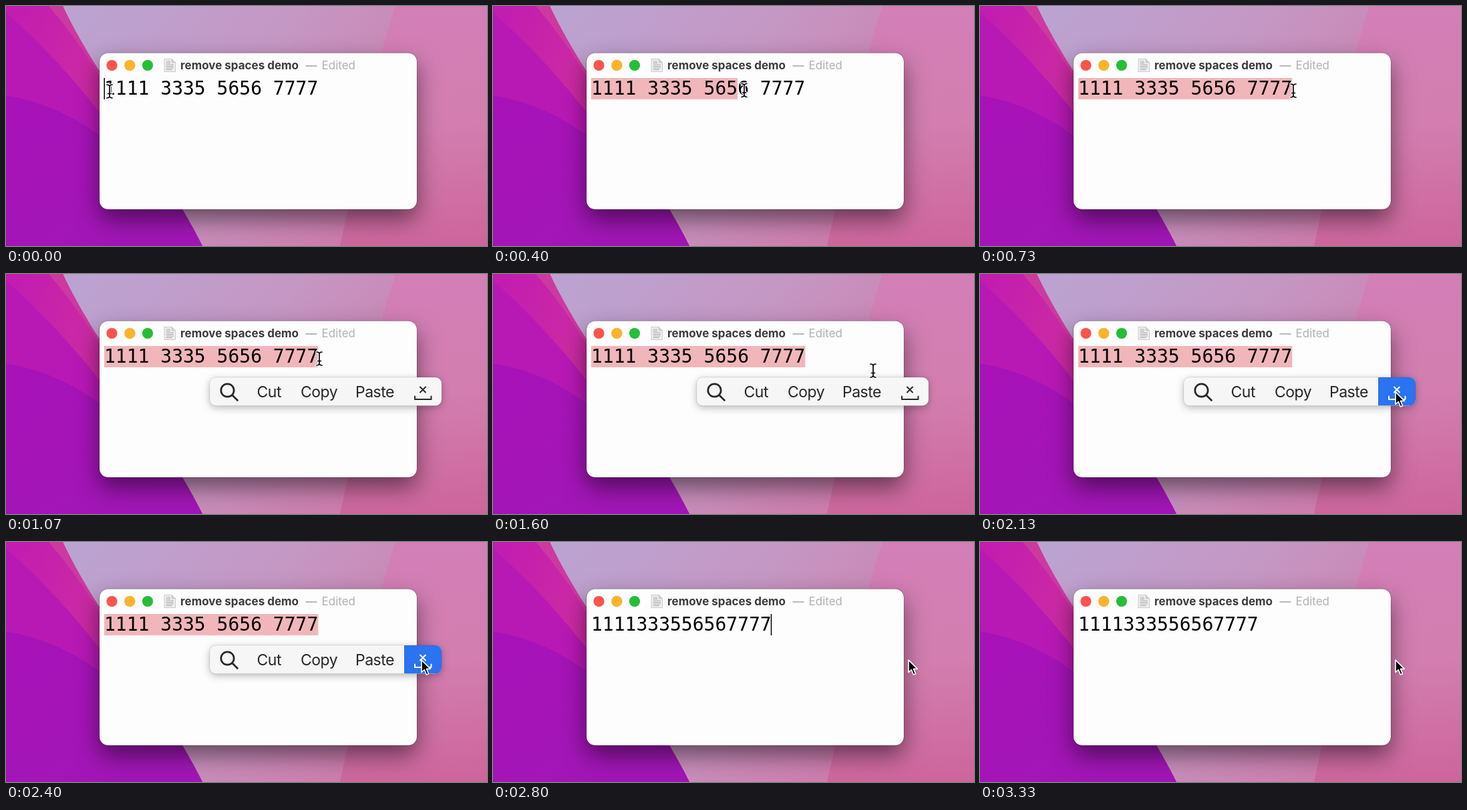
These frames come from a looping animation (720x360 px, 3.39 s). An HTML page:

```html
<!DOCTYPE html>
<html lang="en">
<head>
<meta charset="utf-8">
<title>Remove spaces</title>
<style>
  html, body { margin: 0; width: 100%; height: 100%; overflow: hidden; }
  svg { display: block; width: 720px; height: 360px; }
  text { white-space: pre; }
  .ui { font-family: Inter, sans-serif; font-size: 17px; }
  .mono { font-family: "DejaVu Sans Mono", monospace; font-size: 28px; }
  .menu { font-family: Inter, sans-serif; font-size: 23px; letter-spacing: -.5px; fill: #262626; }
  .line { fill: none; stroke-linecap: round; stroke-linejoin: round; }
  #window { filter: drop-shadow(0 15px 17px rgba(0, 0, 0, .5)); }
  #panel { filter: drop-shadow(0 3px 6px rgba(0, 0, 0, .28)); }
</style>
</head>
<body>
<svg viewBox="0 0 720 360">
  <defs>
    <linearGradient id="sky" gradientUnits="userSpaceOnUse" x1="120" y1="0" x2="560" y2="360">
      <stop offset="0" stop-color="#bba3d1"/>
      <stop offset=".45" stop-color="#c597c3"/>
      <stop offset="1" stop-color="#cf78a8"/>
    </linearGradient>
    <linearGradient id="rose" gradientUnits="userSpaceOnUse" x1="640" y1="0" x2="670" y2="360">
      <stop offset="0" stop-color="#d37fb8"/>
      <stop offset=".5" stop-color="#d27eaf"/>
      <stop offset="1" stop-color="#cd659b"/>
    </linearGradient>
    <linearGradient id="magenta" gradientUnits="userSpaceOnUse" x1="0" y1="30" x2="130" y2="90">
      <stop offset="0" stop-color="#c21cb0"/>
      <stop offset="1" stop-color="#cb2aa4"/>
    </linearGradient>
    <linearGradient id="violet" gradientUnits="userSpaceOnUse" x1="20" y1="130" x2="150" y2="360">
      <stop offset="0" stop-color="#a812b8"/>
      <stop offset="1" stop-color="#a116b6"/>
    </linearGradient>
    <clipPath id="panelShape"><rect x="305" y="155" width="347" height="42.5" rx="9"/></clipPath>
  </defs>

  <rect width="720" height="360" fill="url(#sky)"/>
  <path d="M583 0C574 28 565 54 559 90L500 360H720V0Z" fill="url(#rose)"/>
  <path d="M0 0H85C103 38 121 68 140 98L264 305Q281 334 294 360H0Z" fill="url(#magenta)"/>
  <path d="M64 0H85C103 38 121 68 140 98V105Q104 46 64 0Z" fill="#cc3a9f"/>
  <path d="M0 10Q76 76 150 172L264 305Q281 334 294 360H0Z" fill="#b819b5"/>
  <path d="M0 134Q84 148 150 202L264 305Q281 334 294 360H0Z" fill="url(#violet)"/>

  <rect id="window" x="140" y="70.5" width="475" height="234.5" rx="13" fill="#fdfdfd"/>
  <rect x="139.75" y="70.25" width="475.5" height="235" rx="13" fill="none" stroke="#000" stroke-opacity=".3" stroke-width=".7"/>
  <g stroke="#000" stroke-opacity=".12" stroke-width=".7">
    <circle cx="158.5" cy="89" r="8" fill="#ff534c"/>
    <circle cx="185.3" cy="89" r="8" fill="#ffb428"/>
    <circle cx="212" cy="89" r="8" fill="#23c035"/>
  </g>
  <path d="M237 79.5H248L253.500 85V98.500H237Z" fill="#f1f1f1" stroke="#bdbdbd" stroke-width=".8"/>
  <path d="M248 79.500V85H253.500Z" fill="#d2d2d2" stroke="#bdbdbd" stroke-width=".6"/>
  <path d="M239.500 83H246M239.500 85.500H246M239.500 88H251M239.500 90.500H251M239.500 93H251M239.500 95.500H249" stroke="#a3a3a3" stroke-width="1"/>
  <g class="ui">
    <text x="261" y="95" font-weight="700" fill="#3b3b3b">remove spaces demo</text>
    <text x="457" y="95" font-weight="600" fill="#b0b0b0" text-anchor="middle">—</text>
    <text x="472.500" y="95" fill="#b2b2b2">Edited</text>
  </g>

  <rect id="selection" x="147" y="108" width="0" height="32" fill="#f1b6ba"/>
  <text id="digits" class="mono" x="147" y="133"></text>
  <rect id="caret" y="108" width="1.500" height="32"/>

  <g id="popup">
    <rect id="panel" x="305" y="155" width="347" height="42.500" rx="9" fill="#f7f6f7"/>
    <rect id="hot" x="596" y="155" width="56" height="42.500" fill="#2a73f1" clip-path="url(#panelShape)"/>
    <rect x="304.750" y="154.750" width="347.500" height="43" rx="9" fill="none" stroke="#000" stroke-opacity=".16" stroke-width=".6"/>
    <g class="line" stroke="#262626" stroke-width="2.700">
      <circle cx="331.500" cy="174.500" r="9.700"/>
      <path d="M338.700 181.700L346.500 189.500"/>
    </g>
    <g class="menu">
      <text x="375.500" y="185">Cut</text>
      <text x="441" y="185">Copy</text>
      <text x="523" y="185">Paste</text>
    </g>
    <path id="glyph" class="line" stroke-width="2" d="M620 169.500L628 177.500M628 169.500L620 177.500M612 183.500V188H636.500V183.500"/>
  </g>

  <g id="beam" class="line">
    <path id="beamLine" d="M-4-10Q-1-10 0-8Q1-10 4-10M0-8V8M-4 10Q-1 10 0 8Q1 10 4 10M-2.500 3.500H2.500" stroke="#fff" stroke-width="4"/>
    <use href="#beamLine" id="beamInk"/>
    <path d="M-4-10Q-1-10 0-8Q1-10 4-10M0-8V8M-4 10Q-1 10 0 8Q1 10 4 10M-2.500 3.500H2.500" stroke="#000" stroke-width="1.700"/>
  </g>
  <path id="arrow" d="M0 0V18.500L4.300 14.500L7.400 22L10.600 20.700L7.500 13.400H13.300Z" stroke="#fff" stroke-width="1.600" stroke-linejoin="round"/>
</svg>
<script>
  const LOOP = 3390, STEP = 200 / 3, LEFT = 147, CHAR = 16.86;
  const SPACED = "1111 3335 5656 7777", JOINED = SPACED.replaceAll(" ", "");
  const POPUP_IN = 790, ARROW = 1730, EDIT = 2460, CARET_OFF = 3060;

  const linear = p => p;
  const easeIn = p => p ** 1.5;
  const easeOut = p => 1 - (1 - p) ** 1.8;
  // time, x, y, easing towards this point
  const path = [
    [0, 155, 128, linear],
    [400, 376, 126.5, easeIn],
    [667, 469, 127, easeOut],
    [1130, 469, 127, linear],
    [1600, 569, 145, easeIn],
    [1867, 622, 177, easeOut],
    [LOOP, 622, 177, linear]
  ];

  const el = id => document.getElementById(id);
  const show = (id, on) => el(id).setAttribute("visibility", on ? "visible" : "hidden");
  const clamp = v => Math.min(1, Math.max(0, v));
  el("beamInk").remove();

  function pointerAt(t) {
    const i = Math.max(1, path.findIndex(p => p[0] >= t));
    const [t0, x0, y0] = path[i - 1], [t1, x1, y1, ease] = path[i];
    const p = ease((t - t0) / (t1 - t0));
    return [x0 + (x1 - x0) * p, y0 + (y1 - y0) * p];
  }

  function draw(time) {
    const t = Math.floor((time + 4) / STEP) * STEP;
    const [x, y] = pointerAt(t);
    const edited = t >= EDIT, arrow = t >= ARROW;
    const count = edited ? 0 : Math.min(SPACED.length, Math.floor((x - LEFT) / CHAR));
    const hot = arrow && x >= 596;

    el("digits").textContent = edited ? JOINED : SPACED;
    el("selection").setAttribute("width", count * CHAR);
    el("caret").setAttribute("x", edited ? LEFT + JOINED.length * CHAR - 1 : LEFT - .5);
    show("caret", !count && t < CARET_OFF);

    const fade = clamp((t - POPUP_IN) / 130) * clamp((2530 - t) / 130);
    el("popup").setAttribute("opacity", fade);
    show("hot", hot);
    el("glyph").setAttribute("stroke", hot ? "#fff" : "#262626");

    show("beam", !arrow);
    show("arrow", arrow);
    el(arrow ? "arrow" : "beam").setAttribute("transform", `translate(${x} ${y})`);
  }

  const start = performance.now();
  function tick() {
    draw((performance.now() - start) % LOOP);
    requestAnimationFrame(tick);
  }
  draw(0);
  requestAnimationFrame(tick);
</script>
</body>
</html>
```
